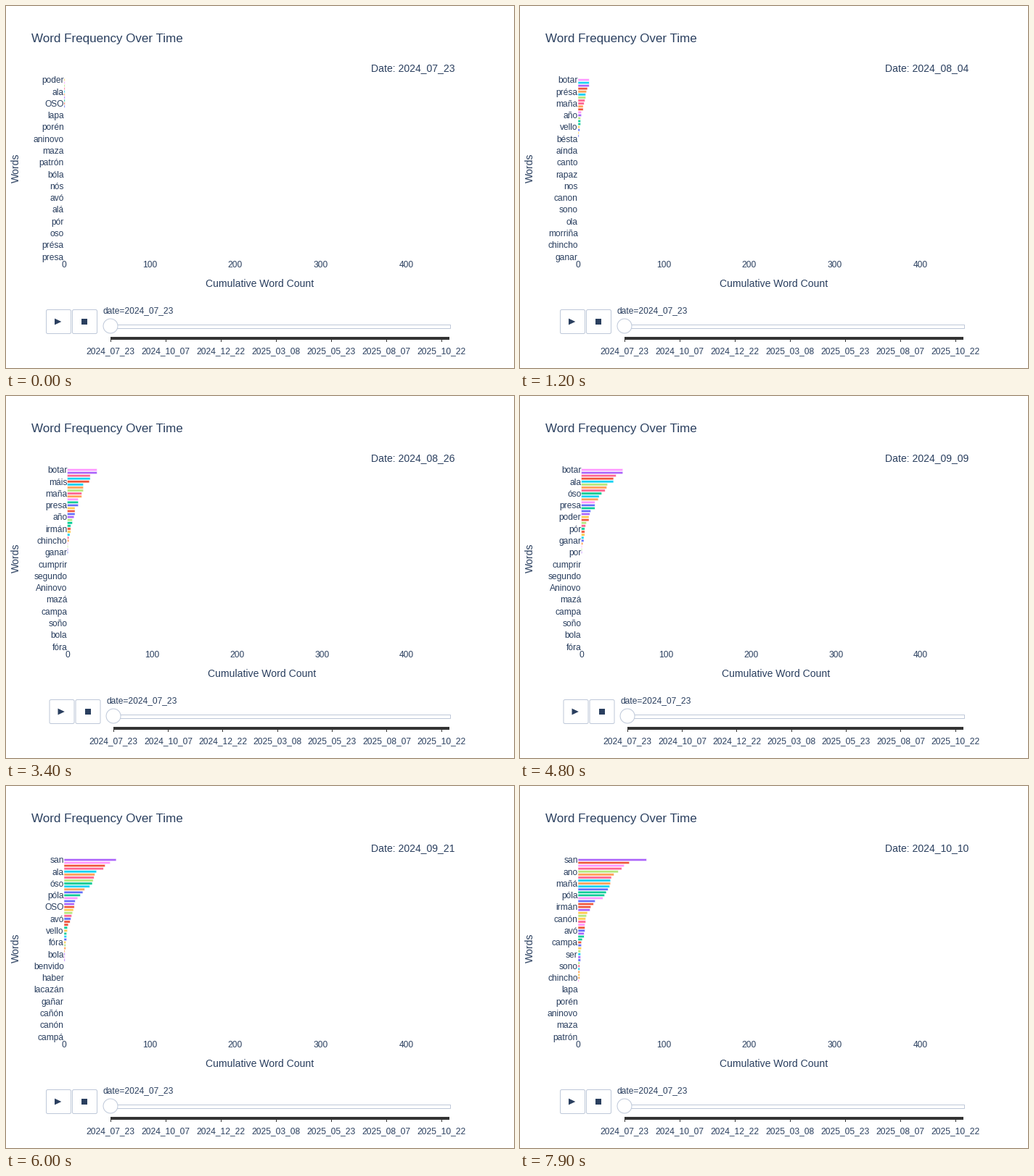
A matplotlib script for the animation above (8000 ms loop, 700 by 500 pixels).

```python
import matplotlib.pyplot as plt
import numpy as np
from matplotlib.animation import FuncAnimation
from matplotlib.patches import Circle, FancyBboxPatch, Polygon, Rectangle

plt.rcParams.update({"font.family": "Liberation Sans",
                     "text.hinting": "force_autohint"})

W, H, DPI = 700, 500, 100
PX = 72 / DPI
RIGHT, TOP, PITCH, X_MAX = 620, 100, 4.072, 458
INK, EDGE = "#2a3f5f", "#bec8d9"
PALETTE = ["#636efa", "#ef553b", "#00cc96", "#ab63fa", "#ffa15a",
           "#19d3f3", "#ff6692", "#b6e880", "#ff97ff", "#fecb52"]
START = np.datetime64("2024-07-23")

# Cumulative counts on these days; short rows cover only the last days.
DAYS = [0, 12, 24, 34, 48, 60, 79]
EARLY = {
    "mais": (1, 5, 9, 11, 13, 20),
    "OSO": (6, 9, 9, 9, 12, 18),
    "póla": (3, 4, 6, 16, 19, 31),
    "san": (13, 25, 35, 49, 61, 80),
    "mañá": (6, 11, 17, 20, 24, 38),
    "ala": (13, 24, 27, 38, 38, 38),
    "baleiro": (8, 19, 27, 41, 46, 51),
    "ano": (9, 13, 19, 31, 34, 47),
    "botar": (13, 25, 35, 49, 54, 54),
    "poder": (1, 9, 9, 9, 11, 11),
    "presa": (2, 6, 13, 16, 22, 35),
    "máis": (11, 20, 26, 38, 48, 60),
    "óso": (3, 6, 13, 24, 33, 33),
    "año": (4, 5, 8, 10, 12, 14),
    "présa": (10, 16, 19, 30, 36, 42),
    "pola": (9, 17, 19, 21, 30, 37),
    "maña": (7, 14, 17, 28, 35, 39),
    "besta": (3, 6, 6, 6, 10, 10),
    "oso": (4, 10, 13, 16, 16, 29),
    "vello": (2, 3, 4, 4, 4, 4),
}
LATE = {
    "ganar": (1, 1, 3, 3, 3), "irmán": (2, 4, 4, 7, 15),
    "pór": (4, 4, 4, 5), "por": (1, 1, 1, 3), "chincho": (2, 2, 2, 2),
    "ser": (3, 3, 3, 3), "alá": (2, 5, 9, 9), "sen": (1, 1, 2, 3),
    "morriña": (1, 1, 1, 1),
    "fóra": (2, 2), "avó": (8, 8), "fora": (5, 8), "ola": (3, 7),
    "bola": (1, 7), "nós": (1, 2),
    "campá": (2,), "sono": (2,), "soño": (2,), "bóla": (8,),
    "canón": (9,), "canon": (4,), "campa": (4,),
}
UNSEEN = ("patrón cañón nos mazá maza gañar rapaz Aninovo aninovo lacazán canto "
          "segundo porén haber aínda cumprir lapa benvido bésta").split()
INITIAL = 10
WORDS = [*EARLY, *LATE, *UNSEEN]


def build_curves():
    """Day and count points of each word, from its first appearance on."""
    rows = [*EARLY.values(), *LATE.values()]
    newcomers = {}
    for i, row in enumerate(rows[INITIAL:], INITIAL):
        newcomers.setdefault(len(row), []).append(i)
    curves = []
    for i, row in enumerate(rows):
        n = len(row)
        first = 0
        if i >= INITIAL:
            group = newcomers[n]
            a, b = DAYS[-n - 1], DAYS[-n]
            first = a + 1 + group.index(i) * 2 * (b - a) // (3 * len(group))
        curves.append(([first, *DAYS[-n:]], [1, *row]))
    return curves


CURVES = build_curves()


def counts_on(day):
    seen = [int(np.interp(day, xs, ys, left=0) + 0.5) for xs, ys in CURVES]
    return seen + [0] * len(UNSEEN)


def date_text(day):
    return str(START + int(day)).replace("-", "_")


fig = plt.figure(figsize=(W / DPI, H / DPI), dpi=DPI, facecolor="white")
ax = fig.add_axes([0, 0, 1, 1])


def text(x, y, s, size=12, ha="center", **kw):
    ax.text(x, y, s, fontsize=size * PX, color=INK, ha=ha, va="baseline", **kw)


def shape(patch, fill, edge="none", lw=1.0, z=2, snap=None):
    patch.set(facecolor=fill, edgecolor=edge, linewidth=lw * PX, zorder=z,
              snap=snap)
    ax.add_patch(patch)


def draw_bars(day, left, counts, order):
    scale = (RIGHT - left) / X_MAX
    for row, i in enumerate(order):
        y = TOP + (row + 0.5) * PITCH
        if counts[i]:
            bar = Rectangle((left, y - 0.4 * PITCH), counts[i] * scale, 0.8 * PITCH)
            shape(bar, PALETTE[i % 10], "white", 0.5, snap=False)
        if row % 4 == 0:
            text(left - 0.2, y + 4.2, WORDS[i], ha="right")
    for value in range(0, 500, 100):
        text(left + value * scale, 361.2, value)
    text((left + RIGHT) / 2, 388, "Cumulative Word Count", 14)
    text(618.5, 90, "Date: " + date_text(day), 14, ha="right")


def draw_buttons(left):
    for x in (left - 24.5, left + 11.5):
        box = FancyBboxPatch((x + 2, 421.5), 30, 29,
                             boxstyle="round,pad=2,rounding_size=2")
        shape(box, "white", EDGE)
    x = left - 13
    shape(Polygon([(x, 431.6), (x + 9.3, 436), (x, 440.4)]), INK, z=3)
    shape(Rectangle((left + 24, 432), 8, 8), INK, z=3)


def draw_slider(left):
    x0 = left + 0.1 * (RIGHT - left)
    begin, end = x0 + 10, 610.5
    text(x0, 424, "date=" + date_text(0), ha="left")
    shape(Rectangle((begin - 1.5, 439.5), end - begin + 3, 5), "white", EDGE)
    shape(Circle((begin, 442), 10), "white", EDGE, z=3)
    shape(Rectangle((begin - 0.5, 457), end - begin + 1, 4), "#333333")
    for k, day in enumerate((0, 76, 152, 228, 304, 380, 456)):
        x = begin + k * (600.2 - begin) / 6
        shape(Rectangle((x - 0.5, 457), 1, 7), "#333333")
        text(x, 480, date_text(day))


def draw(day):
    ax.clear()
    ax.set(xlim=(0, W), ylim=(H, 0))
    ax.axis("off")
    counts = counts_on(day)
    order = sorted(range(len(WORDS)), key=lambda i: (-counts[i], -i))
    # The widest label pushes the whole layout to the right.
    left = 84.5 if "segundo" in [WORDS[i] for i in order[::4]] else 80
    text(35, 50, "Word Frequency Over Time", 17, ha="left")
    text(18, 224, "Words", 14, rotation=90, rotation_mode="anchor")
    draw_bars(day, left, counts, order)
    draw_buttons(left)
    draw_slider(left)
    return []


anim = FuncAnimation(fig, draw, frames=80, interval=100, repeat=True,
                     repeat_delay=0, blit=False)
plt.show()
```
